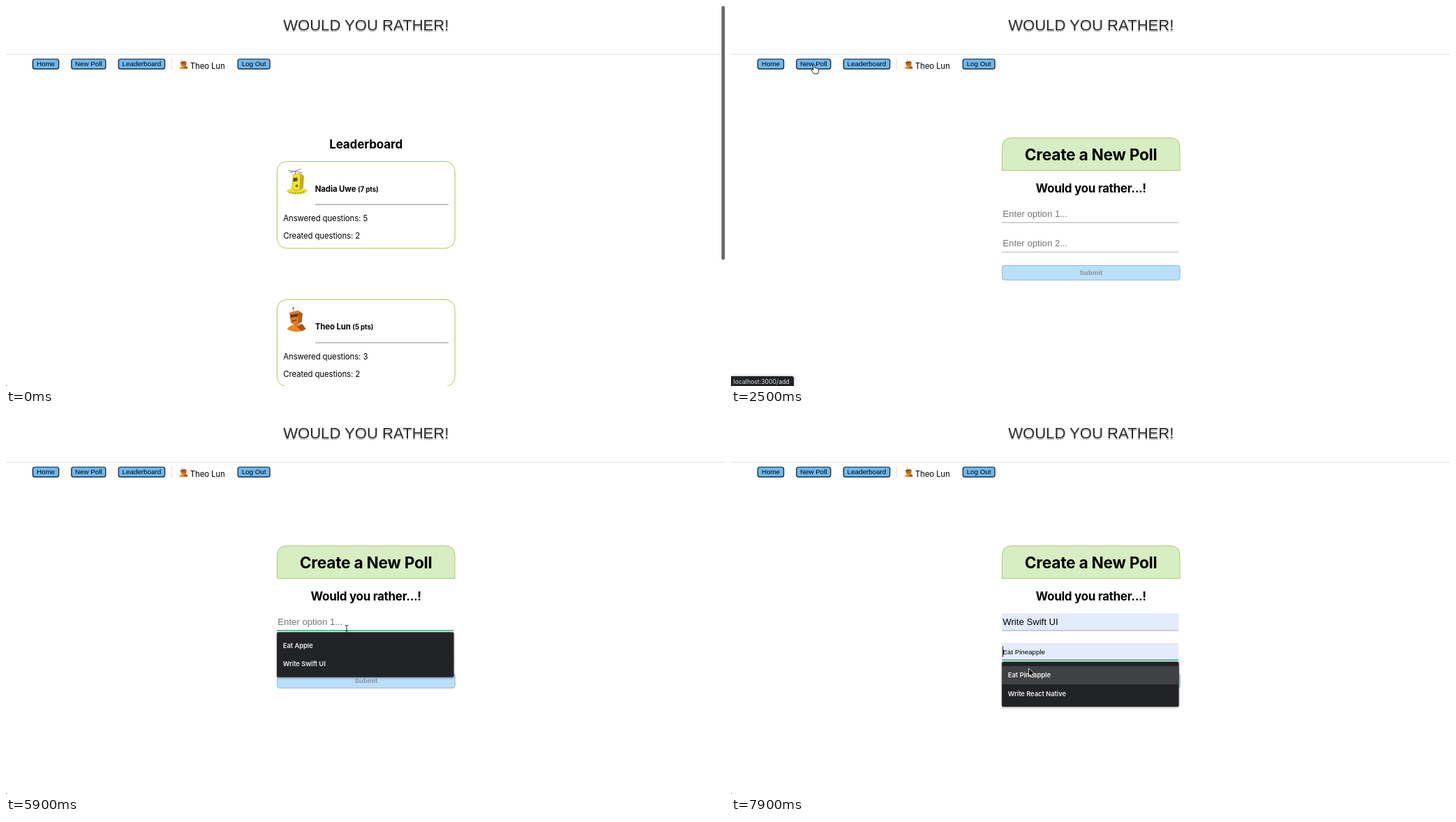
These frames come from a looping animation (1030x544 px, 8000 ms). An HTML page:

```html
<!DOCTYPE html>
<html lang="en">
<head>
<meta charset="utf-8">
<title>Would You Rather</title>
<style>
  html, body { margin: 0; width: 100%; height: 100%; overflow: hidden; background: #fff; }
  svg { display: block; width: 1030px; height: 544px; }
  text { font: 11.35px Inter, sans-serif; letter-spacing: -.08px; white-space: pre; }
  .mid { text-anchor: middle; }
  .title { font: 22.1px "Liberation Sans", sans-serif; letter-spacing: 0; fill: #2a2a2a; text-shadow: 0 1.2px 0 #f6f6f6, 0 2.4px 0 #a8a8a8; }
  .nav { font: 9.8px "Liberation Sans", sans-serif; letter-spacing: 0; }
  .h1 { font-size: 22.7px; font-weight: 700; letter-spacing: -.25px; }
  .h2 { font-size: 17px; font-weight: 700; letter-spacing: -.3px; }
  .wide { letter-spacing: -.12px; }
  .name { font-weight: 700; }
  .pts { font-size: 9.7px; }
  .field { font: 13.16px "Liberation Sans", sans-serif; letter-spacing: 0; }
  .hint { fill: #757575; }
  .preview { font: 9.75px "Liberation Sans", sans-serif; letter-spacing: 0; }
  .submit { font: bold 9.75px "Liberation Sans", sans-serif; letter-spacing: 0; fill: #83949f; }
  .item { font-size: 9.3px; font-weight: 600; letter-spacing: 0; fill: #f1f1f2; }
  .status { font-size: 8.7px; letter-spacing: 0; fill: #e4e4e6; }
  .menu { filter: drop-shadow(0 1px 1.5px #0007); }
  .bubble { filter: drop-shadow(0 0 2px #0005); }
</style>
</head>
<body>
<svg id="stage" viewBox="0 0 1030 544">
  <defs>
    <g id="copter">
      <path d="M0 32q7-4 15-4t16 3q-3 6-15 6T0 32z" fill="#ecdc2c"/>
      <path d="M4 34q11 4 23-1" stroke="#6d8a25" stroke-width="1.2" stroke-dasharray="2.500 1.500" fill="none"/>
      <path d="M3 3l20 3M5 6l16-5M13 4v5" stroke="#777" stroke-width=".9" fill="none"/>
      <path d="M10 9l10-2 5 4-1 17-10 4-6-4z" fill="#f3e52b" stroke="#8c7f10" stroke-width=".5"/>
      <path d="M20 7l5 4-1 17-5 2z" fill="#c3b015"/>
      <path d="M10 14l6-1v5l-6 1z" fill="#4b4a35"/>
      <circle cx="15" cy="25" r="2" fill="#847718"/>
    </g>
    <g id="robot">
      <path d="M1 32q5-6 12-6l9-1 6 7q-5 4-13 4T1 32z" fill="#ee8425"/>
      <path d="M15 29l8-4 5 7-6 3z" fill="#a8520f"/>
      <path d="M10 7V1" stroke="#777" stroke-width=".9"/>
      <circle cx="10" cy="2" r="1.200" fill="#c8471b"/>
      <path d="M5 9l12-3 6 4-1 12-9 5-6-4z" fill="#df7a20" stroke="#8a430c" stroke-width=".5"/>
      <path d="M18 7l5 3-1 12-5 3z" fill="#b55b12"/>
      <path d="M6 12l11-2v4l-11 2z" fill="#5d3518"/>
      <path d="M8 21l7-2" stroke="#6b3709" stroke-width="1.200"/>
    </g>
    <path id="arrow" d="M0 0v11.5l2.7-2.5 1.9 4.3 1.9-.8-1.9-4.2h3.7z" fill="#000" stroke="#fff" stroke-width=".9"/>
    <path id="hand" d="M-1.2 8V.9Q0-.6 1.1.9V5Q2.3 4.2 3.1 5.3Q4.4 4.7 5.1 5.9Q6.4 5.7 6.5 7V9.5Q6.3 11.5 5.3 13.2H-.3Q-2 11-3.8 8.5Q-4.4 7.2-3.2 6.9Q-2.3 6.9-1.2 8z" fill="#fff" stroke="#111" stroke-width=".9" stroke-linejoin="round"/>
    <path id="beam" d="M-2.5-6Q-.4-6 0-5Q.4-6 2.5-6M0-5V5M-2.5 6Q-.4 6 0 5Q.4 6 2.5 6M-1.3 2H1.3" fill="none" stroke="#222" stroke-width="1"/>
  </defs>
</svg>
<script>
const LOOP = 8000, STEP = 100;
const stage = document.getElementById('stage');
const USER = 'Theo Lun', RIVAL = 'Nadia Uwe';

const text = (x, y, cls, str, id = '') => `<text x="${x}" y="${y}" class="${cls}" id="${id}">${str}</text>`;
const line = (x1, y, x2, color, w = 1, id = '') =>
  `<path id="${id}" d="M${x1} ${y}H${x2}" stroke="${color}" stroke-width="${w}"/>`;
const rect = (x, y, w, h, fill, extra = '') =>
  `<rect x="${x}" y="${y}" width="${w}" height="${h}" fill="${fill}" ${extra}/>`;
const group = (id, body) => `<g id="${id}">${body}</g>`;

const button = (x, w, label) =>
  rect(x, 76, w, 14.2, '#6bb9f3', 'rx="3" stroke="#111" stroke-width="1.2"') +
  text(x + w / 2, 86.4, 'nav mid', label);

const card = (y, avatar, name, pts, answered, created) => `<g transform="translate(0 ${y})">` +
  rect(388.4, .5, 254.7, 124.4, '#fff', 'rx="14" stroke="#9ac63e" stroke-width=".9"') +
  `<use href="#${avatar}" x="401.500" y="10.500"/>` +
  text(442.8, 43.7, 'name', `${name} <tspan class="pts">(${pts} pts)</tspan>`) +
  line(443, 62.2, 634, '#777', .9) +
  text(397.3, 86, '', `Answered questions: ${answered}`) +
  text(397.3, 110.8, '', `Created questions: ${created}`) + '</g>';

const field = (n, y) =>
  group(`fill${n}`, rect(388, y - 24, 253.3, 24, '#e3ecfd') + line(388, y - 23.7, 641.3, '#d9dde8', .7)) +
  line(388, y, 641.3, '#c6c6c8', 1.3, `rule${n}`) +
  text(389.3, y - 8, 'field hint', `Enter option ${n}...`, `hint${n}`);

const menu = (n, y, items) => group(`menu${n}`,
  rect(388, y, 253.5, 64.5, '#222326', 'rx="2" class="menu"') +
  items.map((item, i) =>
    rect(388, y + 6.3 + 26.2 * i, 253.5, 26.2, '#404143', `id="pick${n}${i}"`) +
    text(396.8, y + 22.8 + 26.4 * i, 'item', item)).join(''));

const caret = (id, x, y) => rect(x, y, 1, 15, '#111', `id="${id}"`);

const status = (id, w, url) => group(id,
  `<path class="bubble" d="M0 530H${w - 3}q3 0 3 3V544H0z" fill="#222326"/>` + text(3.6, 541, 'status', url));

stage.insertAdjacentHTML('beforeend',
  text(515.8, 35, 'title mid', 'WOULD YOU RATHER!') +
  line(0, 69.2, 1030, '#dcdcdc') +
  button(38.4, 37.2, 'Home') + button(93.8, 49, 'New Poll') +
  button(161.2, 66.4, 'Leaderboard') + button(332.2, 45.8, 'Log Out') +
  rect(236.6, 75, .9, 16, '#d8d8d8') +
  '<use href="#robot" transform="translate(247.800 76.300) scale(.46 .39)"/>' +
  text(263.8, 90, '', USER) +
  group('board',
    text(515.6, 204, 'h2 wide mid', 'Leaderboard') +
    card(222, 'copter', RIVAL, 7, 5, 2) +
    card(419.8, 'robot', USER, 5, 3, 2) +
    rect(1025, 0, 4.8, 363.5, '#6a6a6b', 'rx="2.4"')) +
  group('poll',
    '<path d="M388.400 235.300V203q0-14.300 14-14.300H629q14 0 14 14.300V235.300z" fill="#d7edc2" stroke="#a0c46c" stroke-width=".9"/>' +
    text(515.6, 220.8, 'h1 mid', 'Create a New Poll') +
    text(515.6, 267.4, 'h2 mid', 'Would you rather...!') +
    field(1, 310) + field(2, 352.3) +
    text(389.3, 301, 'preview', 'Write Swift UI', 'preview1') +
    text(389.3, 302, 'field', 'Write Swift UI', 'value1') +
    text(389.3, 344.4, 'preview', 'Eat Pineapple', 'preview2') +
    caret('caret1', 389, 290) + caret('caretEnd', 469, 290) + caret('caret2', 389, 332.5) +
    rect(388.4, 371.5, 254.8, 20.8, '#b9dff9', 'rx="3" stroke="#92bcd9"') +
    text(515.8, 385.4, 'submit mid', 'Submit') +
    menu(1, 312.2, ['Eat Apple', 'Write Swift UI']) +
    menu(2, 354.6, ['Eat Pineapple', 'Write React Native'])) +
  '<path d="M0 541.500Q0 544 2 544H0z" fill="#333"/>' +
  status('linkBoard', 124, 'localhost:3000/leaderboard') +
  status('linkAdd', 90, 'localhost:3000/add') +
  '<use id="cursor"/>');

const el = id => document.getElementById(id);

// Visible intervals in ms: id -> [from, to, from, to, ...]
const SHOWN = {
  board: [0, 2300], poll: [2300, LOOP], cursor: [400, LOOP],
  linkBoard: [1700, 2000], linkAdd: [2000, 4000],
  hint1: [0, 6700], fill1: [6700, LOOP], preview1: [6700, 6900], value1: [6900, LOOP],
  hint2: [0, 7800], fill2: [7800, LOOP], preview2: [7800, LOOP],
  caret1: [4400, 4900, 5400, 5900, 6400, 6900], caretEnd: [6900, 7500], caret2: [7500, LOOP],
  menu1: [5600, 6900], menu2: [7600, LOOP],
  pick10: [6600, 6700], pick11: [6700, 6900], pick20: [7800, LOOP], pick21: []
};

// Pointer rests and moves: time, x, y
const PATH = [
  [400, 500, 330], [1000, 330, 190], [1600, 190, 88], [1800, 126, 87.3], [2200, 119, 83.8],
  [3600, 119, 83.8], [4200, 488, 308.6], [6300, 488, 308.6], [6800, 448, 356], [6900, 448, 356],
  [7200, 471, 342], [7500, 471, 342], [7900, 426.5, 364]
];
const SHAPES = [[0, 'arrow'], [1500, 'hand'], [3700, 'arrow'], [4200, 'beam'], [6500, 'arrow'], [7100, 'beam'], [7700, 'arrow']];

const ramp = (t, from, to) => Math.min(1, Math.max(0, (t - from) / (to - from)));
const within = (t, spans) => spans.some((from, i) => i % 2 === 0 && t >= from && t < spans[i + 1]);

function pointer(t) {
  const next = PATH.findIndex(p => p[0] > t);
  if (next < 0) return PATH[PATH.length - 1].slice(1);
  if (next === 0) return PATH[0].slice(1);
  const [a, b] = [PATH[next - 1], PATH[next]];
  const k = ramp(t, a[0], b[0]), ease = k * k * (3 - 2 * k);
  return [1, 2].map(i => a[i] + (b[i] - a[i]) * ease);
}

function focusRule(n, on, filled) {
  const rule = el(`rule${n}`);
  rule.setAttribute('stroke', on ? '#2fa872' : filled ? '#b9bfd0' : '#c6c6c8');
  rule.setAttribute('stroke-width', on ? 1.6 : 1.3);
}

function draw(t) {
  for (const id in SHOWN) el(id).style.display = within(t, SHOWN[id]) ? '' : 'none';
  el('linkBoard').style.opacity = ramp(t, 1600, 1920);
  el('linkAdd').style.opacity = 1 - ramp(t, 3700, 4000);
  focusRule(1, t >= 4300 && t < 7500, t >= 6700);
  focusRule(2, t >= 7500, t >= 7800);
  const shape = SHAPES.filter(s => s[0] <= t).pop()[1];
  el('cursor').setAttribute('href', '#' + shape);
  el('cursor').setAttribute('transform', `translate(${pointer(t)})`);
}

const start = performance.now();
function tick() {
  const t = (performance.now() - start) % LOOP;
  draw(Math.floor((t + 1) / STEP) * STEP % LOOP);
  requestAnimationFrame(tick);
}
tick();
</script>
</body>
</html>
```
